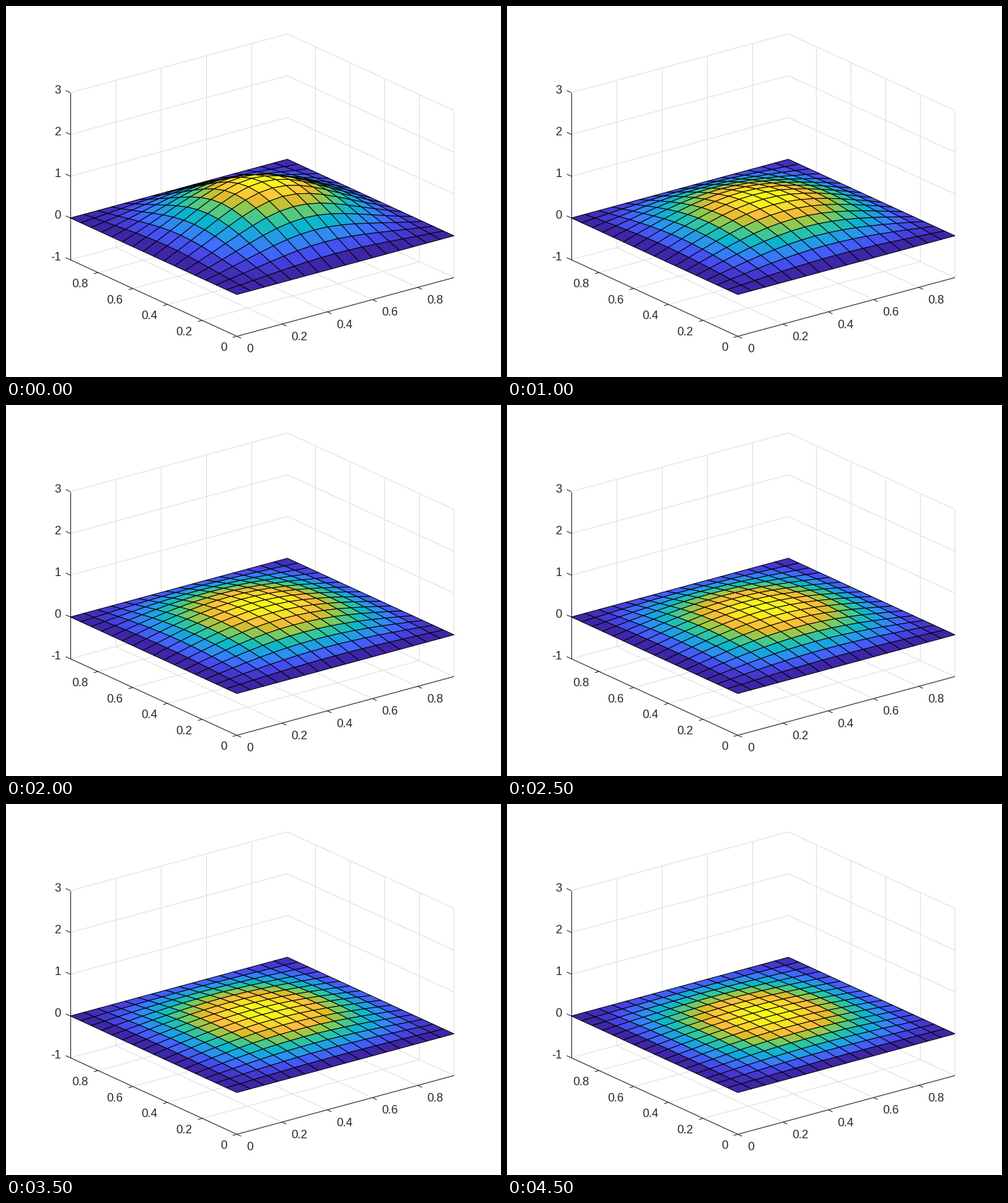
Write a matplotlib script that moves like this. It is 700 px wide and 525 px high and loops after 5000 ms.

```python
import numpy as np
import matplotlib.pyplot as plt
from matplotlib.animation import FuncAnimation
from matplotlib.collections import LineCollection, PolyCollection
from matplotlib.colors import LinearSegmentedColormap

W, H, DPI = 700, 525, 100
PX = 72 / DPI              # one pixel in points
N, SPAN = 16, 0.96         # cells per side, side length
FRAMES, INTERVAL = 10, 500
SUBSTEPS = 10              # diffusion steps per frame
PEAK, SHARP = 0.95, 0.065  # starting amplitude, share of the third harmonic
INK, GRID = "#262626", "#dfdfdf"

STOPS = ("#3e26a8 #4747eb #3e6fff #2797eb #08b5d0 "
         "#31c69f #81cc59 #dcbd29 #fccf30 #f9fb15").split()
RAMP = [(k / 9, c) for k, c in enumerate(STOPS)]
RAMP.insert(8, (53 / 63, "#febe3c"))
CMAP = LinearSegmentedColormap.from_list("ramp", RAMP, N=64)


def project(x, y, z):
    """Orthographic view, azimuth -37.5, elevation 30, in stage pixels."""
    u, v, w = x / SPAN, y / SPAN, (z + 1) / 4
    return np.stack(np.broadcast_arrays(
        326.45 + 307.0 * u - 235.5 * v,
        467.4 - 83.1 * u - 108.3 * v - 236.5 * w), axis=-1)


def line(a, b):
    return [project(*a), project(*b)]


def diffuse(u):
    """One explicit heat step with cold edges."""
    new = np.zeros_like(u)
    new[1:-1, 1:-1] = (u[2:, 1:-1] + u[:-2, 1:-1]
                       + u[1:-1, 2:] + u[1:-1, :-2]) / 4
    return new


def heights():
    s = np.pi * np.arange(N + 1) / N
    g = np.sin(s) - SHARP * np.sin(3 * s)
    u = PEAK * np.outer(g, g)
    out = []
    for _ in range(FRAMES):
        out.append(u)
        for _ in range(SUBSTEPS):
            u = diffuse(u)
    return out


fig = plt.figure(figsize=(W / DPI, H / DPI), dpi=DPI, facecolor="white")
ax = fig.add_axes([0, 0, 1, 1])
ax.set_xlim(0, W)
ax.set_ylim(H, 0)
ax.axis("off")


def add_lines(segs, color, z):
    ax.add_collection(LineCollection(segs, colors=[color], linewidths=PX,
                                     zorder=z))


def label(x, y, text, ha="center"):
    ax.text(x, y, text, ha=ha, va="center_baseline", color=INK,
            family="Liberation Sans", fontsize=16.67 * PX, zorder=5)


def build_box():
    s = SPAN
    ticks = np.arange(5) * 0.2
    grid = []
    axes = [line((0, 0, -1), (s, 0, -1)), line((0, 0, -1), (0, s, -1)),
            line((0, s, -1), (0, s, 3))]
    for k, t in enumerate(ticks):
        grid += [line((t, 0, -1), (t, s, -1)), line((t, s, -1), (t, s, 3)),
                 line((0, t, -1), (s, t, -1)), line((s, t, -1), (s, t, 3))]
        p, q = project(t, 0, -1), project(0, t, -1)
        axes += [[p, p + (6, 2.8)], [q, q + (-6, 1.6)]]
        text = f"{t:.1f}" if k else "0"
        label(p[0] + (25 if k else 18.5), p[1] + 17, text)
        label(q[0] - (25 if k else 18.5), q[1] + 14.8, text)
    for z in range(-1, 4):
        grid += [line((0, s, z), (s, s, z)), line((s, 0, z), (s, s, z))]
        p = project(0, s, z)
        axes.append([p, p + (-6.5, -3)])
        label(77.5, p[1] - 4.8, str(z), "right")
    add_lines(grid, GRID, 1)
    add_lines(axes, INK, 2)


build_box()

# far cells first
cells = sorted(((i, j) for i in range(N) for j in range(N)),
               key=lambda c: -(c[0] + c[1]))
I, J = np.array(cells).T
CI = np.stack([I, I + 1, I + 1, I], axis=1)
CJ = np.stack([J, J, J + 1, J + 1], axis=1)
surface = PolyCollection([], edgecolors="black", linewidths=0.95 * PX,
                         zorder=3)
ax.add_collection(surface)
STATES = heights()


def draw(n):
    u = STATES[n]
    step = SPAN / N
    surface.set_verts(project(CI * step, CJ * step, u[CI, CJ]))
    surface.set_facecolor(CMAP(u[I, J] / u.max()))
    return [surface]


anim = FuncAnimation(fig, draw, frames=FRAMES, interval=INTERVAL,
                     init_func=lambda: draw(0), repeat=True, repeat_delay=0)
plt.show()
```
